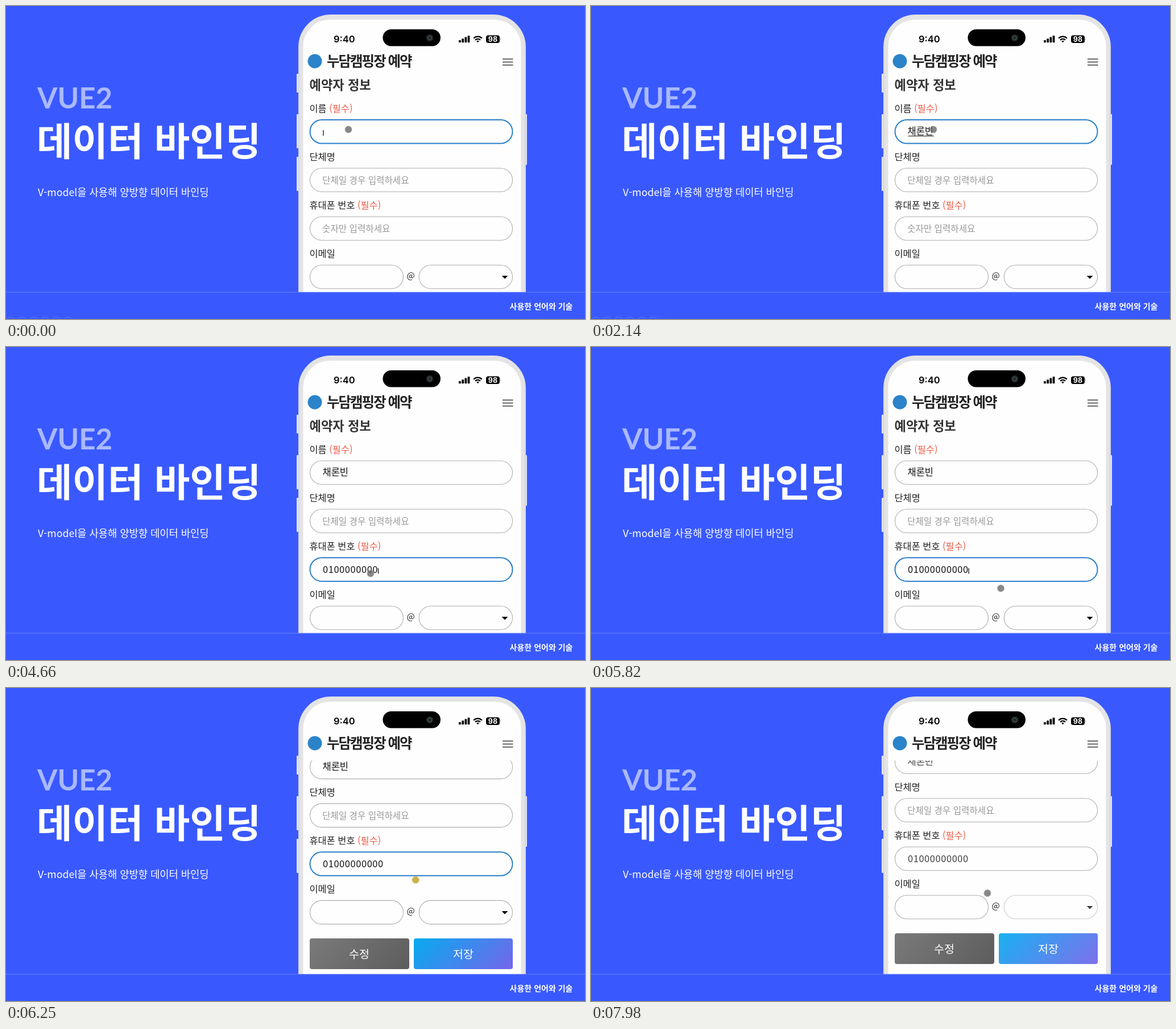
These frames come from a looping animation (1018 by 550 pixels, 8 s). An HTML page:

```html
<!DOCTYPE html>
<html lang="ko">
<head>
<meta charset="utf-8">
<title>VUE2 데이터 바인딩</title>
<style>
  html, body { margin: 0; width: 100%; height: 100%; overflow: hidden; background: #3959ff; }
  svg { display: block; width: 100vw; height: 100vh; }
  text { font-family: "Noto Sans CJK KR", "Noto Sans CJK", sans-serif; fill: #222; }
  .white { fill: #fff; }
  .bold { font-weight: 700; }
  .heavy { font-weight: 900; }
  .label { font-size: 16.4px; font-weight: 300; }
  .need { fill: #f05a46; }
  .hint { font-size: 15.65px; font-weight: 300; fill: #999; }
  .value { font-size: 16.5px; font-weight: 300; fill: #111; }
  .digits { letter-spacing: .55px; }
  .button { font-size: 19.5px; font-weight: 300; fill: #fff; text-anchor: middle; }
  .field { fill: #fefefe; stroke: #adadad; stroke-width: 1.1; }
  .field.focus { stroke: #2a7fc9; stroke-width: 2; }
  .side { fill: #dfe3f2; }
</style>
</head>
<body>
<svg viewBox="0 0 1018 550">
  <defs>
    <clipPath id="stageClip"><rect width="1018" height="503"/></clipPath>
    <clipPath id="pageClip"><rect x="523" y="127.5" width="383" height="375.5"/></clipPath>
    <linearGradient id="metal">
      <stop offset="0" stop-color="#d5d6da"/><stop offset=".008" stop-color="#e3e3e5"/>
      <stop offset=".992" stop-color="#e3e3e5"/><stop offset="1" stop-color="#d2d3d8"/>
    </linearGradient>
    <linearGradient id="gray" gradientUnits="userSpaceOnUse" x1="562" y1="500" x2="680" y2="600">
      <stop stop-color="#797979"/><stop offset="1" stop-color="#5e5e5e"/>
    </linearGradient>
    <linearGradient id="save" gradientUnits="userSpaceOnUse" x1="747" y1="492" x2="861" y2="606">
      <stop stop-color="#07abef"/><stop offset="1" stop-color="#7565ea"/>
    </linearGradient>
  </defs>
  <rect width="1018" height="550" fill="#3959ff"/>
  <text x="55" y="180" class="bold" style="font:700 51px Lato,sans-serif;fill:#aab9ff">VUE2</text>
  <text x="54" y="262.5" class="white heavy" font-size="68">데이터 바인딩</text>
  <text x="56" y="334" class="white" font-size="17.7" font-weight="300">V-model을 사용해 양방향 데이터 바인딩</text>

  <g clip-path="url(#stageClip)">
    <g class="side">
      <rect x="511" y="119" width="5" height="33" rx="1"/>
      <rect x="511" y="190" width="5" height="60" rx="1"/>
      <rect x="511" y="265" width="5" height="60" rx="1"/>
      <rect x="912" y="190" width="4" height="89" rx="1"/>
    </g>
    <rect x="514" y="15" width="400" height="600" rx="57" fill="url(#metal)"/>
    <rect x="517" y="18" width="394" height="600" rx="54" fill="#e4e4e5"/>
    <rect x="522.5" y="24" width="383" height="600" rx="47" fill="#fefefe"/>

    <text x="576" y="64" style="font:600 16.5px Inter,sans-serif;fill:#000">9:40</text>
    <rect x="662.5" y="41" width="101.5" height="29.5" rx="14.75"/>
    <circle cx="745" cy="56" r="6.3" fill="#202526"/>
    <circle cx="745" cy="56" r="4" fill="#3a4445"/>
    <circle cx="745" cy="56" r="2" fill="#171b1c"/>
    <g id="signal"></g>
    <g fill="none" stroke="#000" stroke-width="2.3">
      <path d="M822.2 56.7a10.3 10.3 0 0 1 14.6 0M825 59.7a6.4 6.4 0 0 1 9 0"/>
      <path d="M829.5 64.3l-2.3-2.5a3.3 3.3 0 0 1 4.6 0z" fill="#000" stroke="none"/>
    </g>
    <rect x="844" y="51.5" width="24" height="13.5" rx="4"/>
    <path d="M869 56q2 2 0 4.500z" fill="#888"/>
    <text x="856" y="63" text-anchor="middle" style="font:700 12.5px Inter,sans-serif;fill:#fff">98</text>

    <circle cx="543" cy="97" r="12.500" fill="#2b83c9"/>
    <text x="564" y="106" class="heavy" font-size="24.5" letter-spacing="-2">누담캠핑장 예약</text>
    <path d="M873 93.300h18.500M873 98.500h18.500M873 103.700h18.500" stroke="#666" stroke-width="1.9"/>

    <g clip-path="url(#pageClip)">
      <g id="page">
        <text x="533.5" y="146.500" class="bold" font-size="22.2" style="fill:#333">예약자 정보</text>
        <text x="533.5" y="186" class="label">이름 <tspan class="need">(필수)</tspan></text>
        <text x="533.5" y="271" class="label">단체명</text>
        <text x="533.5" y="356" class="label">휴대폰 번호 <tspan class="need">(필수)</tspan></text>
        <text x="533.5" y="441" class="label">이메일</text>
        <g id="fields"></g>
        <text x="556" y="311.500" class="hint">단체일 경우 입력하세요</text>
        <text x="556" y="396.700" class="hint" id="phoneHint">숫자만 입력하세요</text>
        <text x="556.5" y="226" class="value" id="name"></text>
        <path id="underline" stroke="#111" stroke-width="1.2"/>
        <text x="557" y="396.500" class="value digits" id="phone"></text>
        <path id="caret" stroke="#222" stroke-width="1.4"/>
        <text x="704.5" y="479" class="label" style="font-size:15px">@</text>
        <path id="arrow" d="M872.500 474.500h9l-4.500 4.500z" stroke="#000" stroke-linejoin="round"/>
        <rect x="534" y="522" width="175" height="54" rx="4" fill="url(#gray)"/>
        <rect x="717" y="522" width="174" height="54" rx="4" fill="url(#save)" id="saveBox"/>
        <text x="621" y="556.500" class="button">수정</text>
        <text x="804" y="556.500" class="button">저장</text>
      </g>
    </g>
    <circle id="pointer" r="6" stroke-width="1"/>
  </g>

  <path d="M0 503h1018" stroke="#6a83ff"/>
  <text x="996.500" y="532.800" class="white heavy" font-size="14" text-anchor="end">사용한 언어와 기술</text>
  <g id="dots" fill="none" stroke="#6179f2" stroke-width="1"></g>
</svg>
<script>
const LOOP = 8000;
const $ = id => document.getElementById(id);
const shapes = (n, make) => Array.from({ length: n }, (_, i) => make(i)).join('');

$('signal').innerHTML = shapes(4, i =>
  `<rect x="${796 + i * 5.2}" y="${60 - i * 2.7}" width="3.8" height="${4.3 + i * 2.7}" rx="1"/>`);
$('dots').innerHTML = shapes(6, i => `<circle cx="${8 + i * 20.2}" cy="554.5" r="8"/>`);

const field = (id, x, y, w) =>
  `<rect id="${id}" class="field" x="${x}" y="${y}" width="${w}" height="41.5" rx="20.75"/>`;
$('fields').innerHTML =
  field('nameField', 534.5, 200, 356) + field('groupField', 534.5, 285, 356) +
  field('phoneField', 534.5, 370.2, 356) + field('mailField', 534.5, 455.3, 164) +
  field('domainField', 726.2, 455.3, 164.3);

const NAME_STEPS = ['ㅊ', '채', '챌', '채로', '채론', '채론ㅂ', '채론비', '채론빈'];
const NAME_START = 1060, NAME_GAP = 84;
const PHONE = '01000000000';
const PHONE_KEYS = [3130, 3360, 3510, 3710, 3810, 3990, 4150, 4280, 4450, 4660, 4790];
const PHONE_FOCUS = 2610, BLUR = 7010;
const PRESSES = [[2480, 2610], [6010, 6340], [6780, 6960]];

// Steps: [time, ...values]
const POINTER = [
  [0, 602, 217], [2140, 602, 217], [2460, 641, 398], [5230, 641, 398],
  [5820, 720.5, 424], [5930, 721, 434], [6040, 720.5, 430], [6120, 720.5, 371],
  [6310, 720, 322], [6510, 720, 322], [6770, 763, 457.5], [7330, 763, 457.5],
  [7480, 787, 477], [7800, 682, 369], [7980, 697, 360.5]
];
const SCROLL = [[0, 0], [6040, 0], [6120, -42.7], [6200, -74], [6310, -91]];
const FADE = [[0, 0], [BLUR, 0], [7300, 1]];

function sample(steps, t, smooth) {
  const next = steps.findIndex(s => s[0] > t);
  if (next < 0) return steps[steps.length - 1].slice(1);
  const [a, b] = [steps[next - 1], steps[next]];
  let k = (t - a[0]) / (b[0] - a[0]);
  if (smooth) k = k * k * (3 - 2 * k);
  return a.slice(1).map((v, i) => v + (b[i + 1] - v) * k);
}

const gray = v => `rgb(${v},${v},${v})`;
const show = (el, on) => el.style.display = on ? '' : 'none';

function drawText(t) {
  const typed = Math.min(NAME_STEPS.length, Math.floor((t - NAME_START) / NAME_GAP) + 1);
  const name = typed > 0 ? NAME_STEPS[typed - 1] : '';
  const digits = PHONE_KEYS.filter(k => k <= t).length;
  $('name').textContent = name;
  $('phone').textContent = PHONE.slice(0, digits);
  show($('phoneHint'), !digits);
  show($('underline'), name && t < PHONE_FOCUS);
  $('underline').setAttribute('d', `M557.5 228.500h${name.length * 15.1}`);

  const onPhone = t >= PHONE_FOCUS;
  const caretX = onPhone ? 557.5 + digits * 9.7 : 558;
  const caretY = onPhone ? 388.5 : 218;
  const caretOn = onPhone
    ? t < 5290 || (t >= 5790 && t < 6040) || (t >= 6540 && t < BLUR)
    : t < 480 || (t >= 990 && t < NAME_START);
  $('caret').setAttribute('d', `M${caretX} ${caretY}v10`);
  show($('caret'), caretOn);
}

function drawFocus(t) {
  $('nameField').classList.toggle('focus', t < PHONE_FOCUS);
  $('phoneField').classList.toggle('focus', t >= PHONE_FOCUS && t < BLUR);
  const [fade] = sample(FADE, t);
  $('domainField').style.stroke = gray(173 + 30 * fade);
  $('arrow').style.fill = $('arrow').style.stroke = gray(70 * fade);
  $('name').style.fill = $('phone').style.fill = gray(17 + 45 * fade);
  $('saveBox').style.opacity = 1 - .07 * fade;
}

function drawPointer(t) {
  const [x, y] = sample(POINTER, t, t < 6000 || t > 6400);
  const pressed = PRESSES.some(([from, to]) => t >= from && t < to);
  const dot = $('pointer');
  dot.setAttribute('cx', x);
  dot.setAttribute('cy', y);
  dot.setAttribute('fill', pressed ? 'rgba(184,148,20,.72)' : 'rgba(105,105,105,.8)');
  dot.setAttribute('stroke', pressed ? 'rgba(205,180,60,.7)' : 'rgba(165,165,165,.8)');
}

function render(now) {
  const t = now % LOOP;
  drawText(t);
  drawFocus(t);
  drawPointer(t);
  $('page').setAttribute('transform', `translate(0 ${sample(SCROLL, t)[0]})`);
  show($('dots'), t < 2910);
}

const start = performance.now();
function tick() {
  render(performance.now() - start);
  requestAnimationFrame(tick);
}
tick();
</script>
</body>
</html>
```
